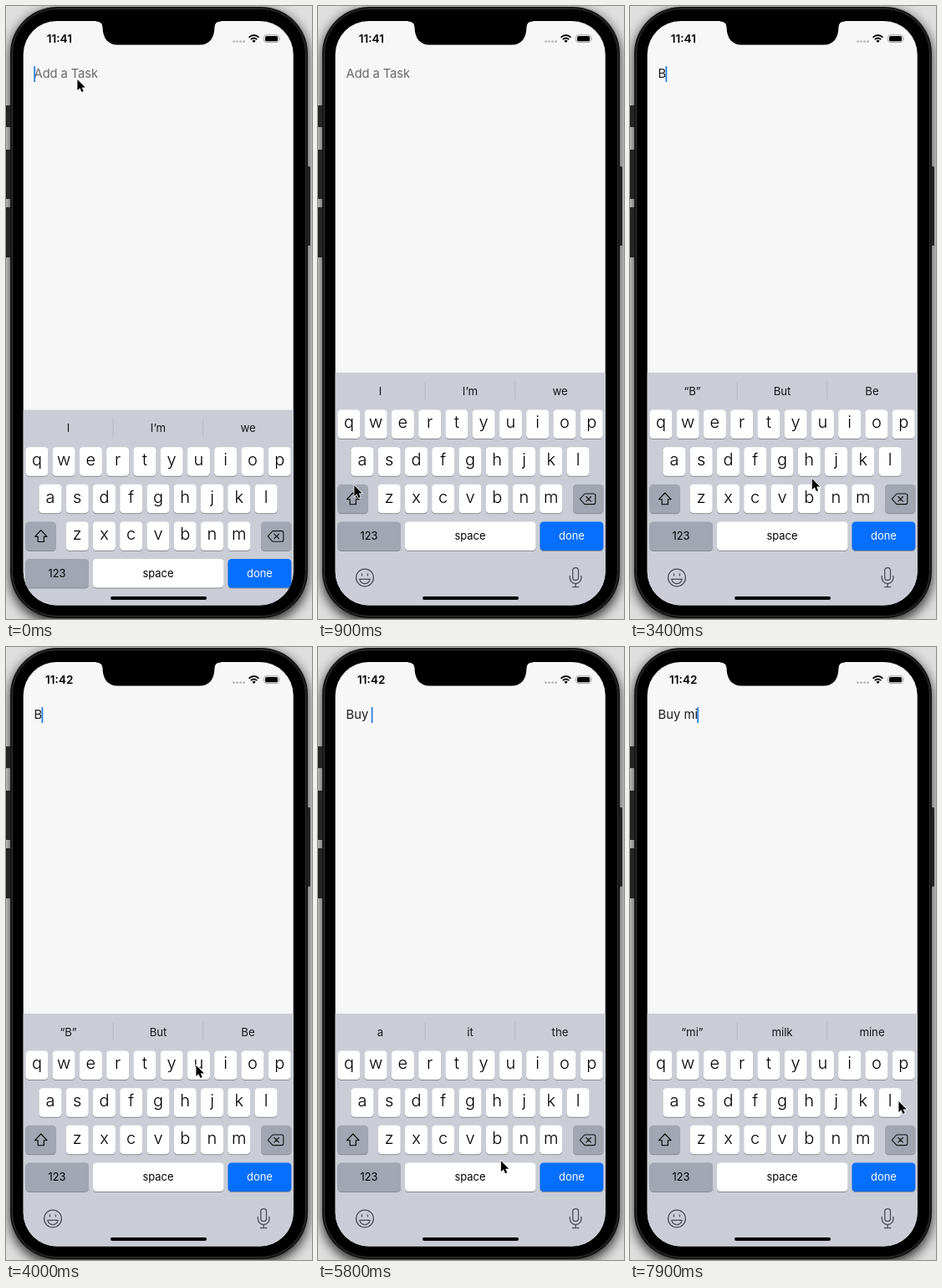
These frames come from a looping animation (366x734 px, 8 s). An HTML page:

```html
<!DOCTYPE html>
<html lang="en">
<head>
<meta charset="utf-8">
<title>Task entry</title>
<style>
  html, body { margin: 0; width: 100%; height: 100%; overflow: hidden; background: #ddd; }
  svg { display: block; }
  text { font-family: Inter, "Liberation Sans", sans-serif; white-space: pre; }
  .mid text { text-anchor: middle; }
  .lower { font-size: 20px; font-weight: 360; }
  .upper { font-size: 18.8px; }
  .hints { font-size: 13.2px; fill: #16171a; }
  .label { font-size: 12.9px; }
  .ghost { fill: #858890; font-size: .86em; }
  .line { fill: none; stroke: #4b4e55; stroke-width: 1.3; stroke-linecap: round; }
</style>
</head>
<body>
<svg width="366" height="734" viewBox="0 0 366 734">
  <defs>
    <filter id="blur" x="-20%" y="-20%" width="140%" height="140%"><feGaussianBlur stdDeviation="7"/></filter>
    <clipPath id="screen"><rect x="20.7" y="18" width="323" height="699.5" rx="40"/></clipPath>
  </defs>

  <rect width="366" height="734" fill="#dedede"/>
  <rect x="5" y="5" width="356" height="734" rx="56" opacity=".8" filter="url(#blur)"/>
  <g fill="#242424">
    <rect x="-2" y="119" width="9" height="26" rx="1.5"/>
    <rect x="-2" y="172" width="9" height="59" rx="1.5"/>
    <rect x="-2" y="241" width="9" height="60" rx="1.5"/>
    <rect x="358" y="192" width="6" height="95" rx="1.5"/>
  </g>
  <rect x="5" y="1" width="356" height="732" rx="56" fill="#161616"/>
  <rect x="7.5" y="3.5" width="351" height="727" rx="53.5" stroke="#333"/>

  <g clip-path="url(#screen)">
    <rect x="20" y="17" width="325" height="702" fill="#f7f7f7"/>
    <text id="task" x="33.6" y="86.3" font-size="14.8"/>
    <rect id="caret" y="72" width="1.8" height="19" fill="#2a7fe0"/>

    <g id="keyboard" class="mid">
      <rect x="20" y="439" width="325" height="340" fill="#cacdd5"/>
      <path d="M128.2 450v21M235.7 450v21" stroke="#b4b7bf"/>
      <g id="hints" class="hints">
        <text x="74.5" y="465.7"/><text x="182" y="465.7"/><text x="289.5" y="465.7"/>
      </g>
      <g id="caps"></g>
      <g id="lower" class="lower"></g>
      <g id="upper" class="upper"></g>
      <path id="shift" d="M41.8 583L49 590.7H45.4V596.8H38.2V590.7H34.600Z" stroke="#000" stroke-width="1.1" stroke-linejoin="round"/>
      <path d="M319 584H329.800Q331.800 584 331.800 586V594.600Q331.800 596.600 329.800 596.600H319L313.200 590.300ZM320.800 587.500l5.600 5.600m0-5.600l-5.600 5.600" fill="none" stroke="#111" stroke-width="1.1" stroke-linejoin="round" stroke-linecap="round"/>
      <g class="label">
        <text x="61" y="639.4">123</text>
        <text x="182" y="639">space</text>
        <text x="303.5" y="639" fill="#fff">done</text>
      </g>
      <g class="line">
        <circle cx="56" cy="684.5" r="10.4"/>
        <path d="M49.8 686.3H62.2Q61 691.6 56 691.6T49.8 686.3ZM52.5 680v2M59.5 680v2"/>
        <rect x="304.7" y="672.7" width="6.8" height="15" rx="3.4"/>
        <path d="M301.300 682.5v2.3a6.8 6.8 0 0 0 13.600 0v-2.3M308.1 691.600v4M304.500 695.7h7.2"/>
      </g>
    </g>
    <rect x="125" y="707" width="115" height="4" rx="2"/>
  </g>

  <path d="M108 17H257V18.5Q250 18.5 249.5 25Q249 46.500 231 46.500H134Q116 46.500 115.500 25Q115 18.500 108 18.500Z"/>
  <g class="mid"><text id="clock" x="63.8" y="43.8" font-size="13.6" font-weight="600"/></g>
  <g fill="#bdbdbd">
    <circle cx="272.5" cy="42.5" r="1.5"/><circle cx="276.5" cy="42.5" r="1.5"/>
    <circle cx="280.5" cy="42.5" r="1.5"/><circle cx="284.5" cy="42.5" r="1.5"/>
  </g>
  <path d="M290.5 37.6Q296.5 32.3 302.5 37.6M292.8 40.1Q296.5 36.9 300.2 40.1" fill="none" stroke="#000" stroke-width="1.9"/>
  <path d="M294.4 41.7Q296.5 40 298.6 41.7L296.5 44Z"/>
  <rect x="308.7" y="34.7" width="17.6" height="8.8" rx="2.6" fill="none" stroke="#999" stroke-width=".9"/>
  <rect x="310" y="36" width="15" height="6.2" rx="1.5"/>
  <path d="M327.4 37.5q1.5 1.6 0 3.2z" fill="#999"/>

  <path id="pointer" d="M.4 1V14L3.4 11.300L5.500 16L7.700 15L5.700 10.400H9.800Z" stroke="#fff" stroke-width="1.5" paint-order="stroke"/>
</svg>
<script>
const LOOP = 8000;
const $ = id => document.getElementById(id);
const rows = ["qwertyuiop", "asdfghjkl", "zxcvbnm"];
const keyPitch = 32.25, rowPitch = 44.6;

function addKey(x, y, w, fill, id = "") {
  const rect = (dy, color, name) =>
    `<rect id="${name}" x="${x}" y="${y + dy}" width="${w}" height="34.5" rx="4.2" fill="${color}"/>`;
  $("caps").innerHTML += rect(1, "#898b91", id + "Shade") + rect(0, fill, id);
}

rows.forEach((row, r) => [...row].forEach((letter, i) => {
  const x = [36.9, 53, 85.2][r] + i * keyPitch, y = 483.6 + r * rowPitch;
  addKey(x - 13.5, y, 27, "#fff");
  $("lower").innerHTML += `<text x="${x}" y="${y + 21.7}">${letter}</text>`;
  $("upper").innerHTML += `<text x="${x}" y="${y + 24.6}">${letter.toUpperCase()}</text>`;
}));
const grey = "#a1a6b2";
addKey(23.5, 572.8, 36.3, grey, "shiftKey");
addKey(305, 572.8, 36.3, grey);
addKey(23.5, 617.4, 75.5, grey);
addKey(104, 617.4, 156.5, "#fff");
addKey(265.5, 617.4, 75.8, "#066fff");

const ghost = s => `<tspan class="ghost">${s}</tspan>`;
// time, typed text, three suggestions
const steps = [
  [0, "", "I", "I’m", "we"],
  [1500, "", "I", "I’m", "We"],
  [3100, "B", "“B”", "But", "Be"],
  [4200, "Bu", "“Bu”", "But", "Buy"],
  [4800, "Buy", "“Buy”", "Buying", "Buys"],
  [5500, "Buy ", "“Buy”", "Buying", "Buys"],
  [5700, "Buy ", "a", "it", "the"],
  [6500, "Buy m", ghost("a"), ghost("i") + "t", "th" + ghost("e")],
  [6700, "Buy m", "“m”", "me", "my"],
  [7300, "Buy mi", "“mi”", "milk", "mine"],
];

// time, x, y of the pointer tip
const stops = [
  [0, 85, 87], [200, 85, 87], [900, 43, 573], [1200, 43, 576], [1950, 43, 576],
  [2400, 267, 570], [2800, 214, 588], [3200, 214, 588], [3800, 227, 500],
  [4300, 227, 500], [4650, 198, 503], [4850, 198, 503], [5200, 197, 617],
  [5650, 197, 625], [6100, 279, 584], [6650, 279, 584], [7100, 262, 501],
  [7350, 262, 501], [7800, 321, 543], [LOOP, 321, 543],
];

const clamp = v => Math.min(1, Math.max(0, v));
const ease = p => p * p * (3 - 2 * p);

function pointerAt(t) {
  const i = stops.findIndex(s => s[0] > t);
  const [t0, x0, y0] = stops[i - 1], [t1, x1, y1] = stops[i];
  const p = ease((t - t0) / (t1 - t0));
  return [x0 + (x1 - x0) * p, y0 + (y1 - y0) * p];
}

// Blinks once a second until typing starts.
function caretOpacity(t) {
  if (t >= 3100) return 1;
  const phase = t % 1000;
  const fadeIn = t < 1000 ? 1 : clamp((phase + 60) / 200);
  return fadeIn * (1 - clamp((phase - 450) / 220));
}

let shown;
function showStep(step) {
  if (step === shown) return;
  shown = step;
  const [time, text, ...hints] = step;
  const task = $("task");
  task.textContent = text || "Add a Task";
  task.setAttribute("fill", text ? "#1b1b1b" : "#696969");
  task.setAttribute("letter-spacing", text ? 0 : -0.13);
  $("caret").setAttribute("x", text ? 32.8 + task.getComputedTextLength() : 33.3);
  hints.forEach((hint, i) => $("hints").children[i].innerHTML = hint);

  const caps = time === 1500;
  $("upper").style.display = caps ? "" : "none";
  $("lower").style.display = caps ? "none" : "";
  $("shiftKey").setAttribute("fill", caps ? "#fff" : grey);
  $("shift").setAttribute("fill", caps ? "#000" : "none");
}

function draw() {
  const t = performance.now() % LOOP;
  showStep(steps.findLast(s => s[0] <= t));
  $("clock").textContent = t < 3900 ? "11:41" : "11:42";
  $("caret").setAttribute("opacity", caretOpacity(t));
  const slide = 45 * (1 - clamp(t / 260)) ** 2;
  $("keyboard").setAttribute("transform", `translate(0 ${slide})`);
  $("pointer").setAttribute("transform", `translate(${pointerAt(t)})`);
  requestAnimationFrame(draw);
}
draw();
</script>
</body>
</html>
```
